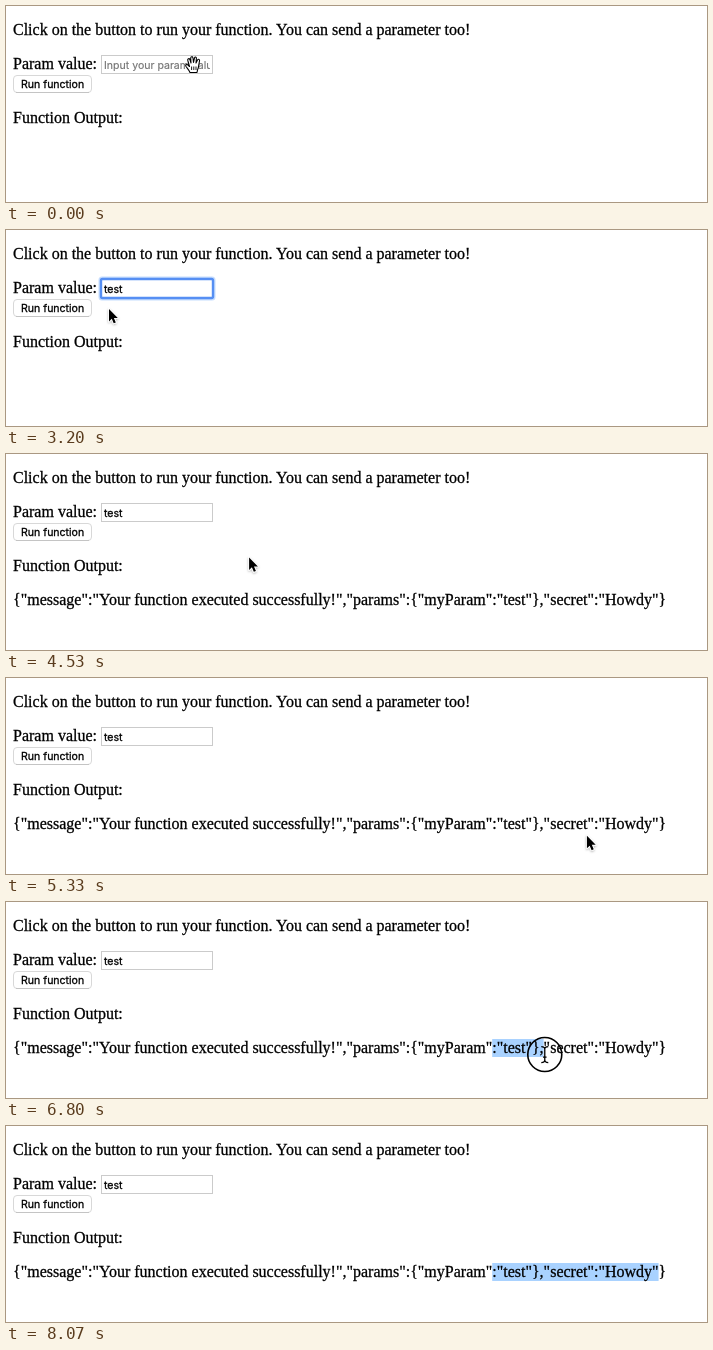
These frames come from a looping animation (701 by 196 pixels, 8390 ms). An HTML page:

```html
<!DOCTYPE html>
<html lang="en">
<head>
<meta charset="utf-8">
<title>Run function</title>
<style>
  html, body { margin: 0; width: 100%; height: 100%; overflow: hidden; background: #fff; }
  svg { display: block; }
  text { stroke: #000; stroke-width: .28; }
  .serif { font: 16px "Liberation Serif", Times, serif; }
  .ui { font: 10.55px Inter, "Liberation Sans", sans-serif; }
  #hint { fill: #757575; stroke: #757575; stroke-width: .15; }
  #arrow { stroke: #fff; stroke-width: 1.6; stroke-linejoin: round; paint-order: stroke; }
</style>
</head>
<body>
<svg width="701" height="196" viewBox="0 0 701 196">
  <defs>
    <clipPath id="field"><rect x="97" y="50" width="107" height="17"/></clipPath>
    <filter id="soft" x="-50%" y="-50%" width="200%" height="200%">
      <feDropShadow dx="0" dy="1" stdDeviation="0.9" flood-opacity="0.3"/>
    </filter>
  </defs>

  <g class="serif">
    <text x="7" y="29">Click on the button to run your function. You can send a parameter too!</text>
    <text x="7" y="63">Param value:</text>
    <text x="7" y="117">Function Output:</text>
    <rect id="selection" y="137" height="18" fill="#a9d2ff"/>
    <text id="output" x="7" y="151">{"message":"Your function executed successfully!","params":{"myParam":"test"},"secret":"Howdy"}</text>
  </g>

  <rect x="95.5" y="49.5" width="111" height="18" fill="#fff" stroke="#cbcbcb"/>
  <g id="ring" fill="none">
    <rect x="93.5" y="47.5" width="115" height="22" rx="2.5" stroke="#5a9bf8" stroke-opacity=".35" stroke-width="2"/>
    <rect x="95" y="49" width="112" height="19" rx="1.5" stroke="#568ff3" stroke-width="2.4"/>
  </g>
  <g class="ui" clip-path="url(#field)">
    <text id="hint" x="98" y="63">Input your param value</text>
    <text id="typed" x="98" y="63"></text>
  </g>
  <rect id="caret" y="52" width="1" height="14"/>

  <rect x="7.5" y="69.5" width="78" height="17" rx="3.5" fill="#fff" stroke="#d8d8d8"/>
  <path d="M10 86.5H83" stroke="#c4c4c4"/>
  <text class="ui" x="15" y="82">Run function</text>

  <circle id="press" fill="none" stroke="#000" stroke-width="1.6"/>
  <g id="pointer">
    <path id="arrow" filter="url(#soft)" d="M0 0V12.4L2.8 9.8 4.7 14.3 6.8 13.4 4.9 9H8.8Z"/>
    <path id="beam" fill="none" stroke="#000" stroke-width="1.3"
      d="M-3.5 -8Q0 -8 0 -5.5Q0 -8 3.5 -8M0 -6V6M-3.5 8Q0 8 0 5.5Q0 8 3.5 8M-1.8 2.5H1.8"/>
    <g id="hand" transform="translate(-8 -9)" stroke="#000" stroke-width="1.1" stroke-linejoin="round">
      <path fill="#fff" d="M5 16.5C4 14 2.5 12.5 1 10.5C0 9 1.5 8 3 9L4.5 10.5 2.8 4.5C2.3 2.5 4.3 2 5 3.8L6 7 5.7 2.2C5.7 .2 7.7 .2 8 2L8.5 6.5 9.5 2C9.9 .5 11.6 .8 11.4 2.5L11 7 12.5 4C13.4 2.6 15 3.4 14.5 5C13.8 8 13.7 12 12.5 14L12 16.5Z"/>
      <path fill="none" stroke-width=".9" d="M6.6 10.5V14M8.8 10.5V14M11 10.5V14"/>
    </g>
  </g>
</svg>

<script>
const LOOP = 8390, RATE = 15;   // motion is stepped at 15 ticks per second
const WORD = "test";

// Events, in ticks
const FOCUS = 22, TYPE = 30, TYPED = 36, REAPPEAR = 44, RUN = 58, RESULT = 61;
const GRAB = 93, DRAG = 98, DROP = 113, LEAVE = 121;
const BLINK = 7.5;

const el = id => document.getElementById(id);
const show = (id, on) => { el(id).style.display = on ? "" : "none"; };
const set = (id, attrs) => { for (const k in attrs) el(id).setAttribute(k, attrs[k]); };
const clamp = (v, lo, hi) => Math.min(hi, Math.max(lo, v));
const within = (v, lo, hi) => v >= lo && v < hi;
const smooth = u => u * u * (3 - 2 * u);

// Eased pointer moves
const home = { x: 187, y: 59 };
const moves = [
  { from: 0, to: 16, x: 168.5, y: 60.5 },
  { from: 43, to: 48, x: 103, y: 79 },
  { from: 48, to: 56, x: 46, y: 84 },
  { from: 63, to: 75, x: 570, y: 136 },
  { from: 76, to: 83, x: 588, y: 172 },
  { from: 83, to: GRAB, x: 483.5, y: 155.5 },
  { from: DRAG - 1, to: 110, x: 651, y: 146.5 },
  { from: 117, to: 120, x: 670, y: 137 }
];

const output = el("output"), line = output.textContent;
const edges = [...line].map((c, i) => output.getStartPositionOfChar(i).x)
  .slice(line.indexOf(':"test"'));

function pointerAt(tick) {
  return moves.reduce((p, m) => {
    const u = smooth(clamp((tick - m.from) / (m.to - m.from), 0, 1));
    return { x: p.x + (m.x - p.x) * u, y: p.y + (m.y - p.y) * u };
  }, home);
}

function pointerKind(tick, { x, y }) {
  if (tick < 1) return "hand";
  const overField = within(x, 95, 207) && within(y, 49, 68);
  const overOutput = tick >= RESULT && x < 661 && within(y, 137, 155.3);
  return overField || overOutput ? "beam" : "arrow";
}

function drawPointer(tick, pos) {
  const kind = pointerKind(tick, pos);
  for (const k of ["hand", "beam", "arrow"]) show(k, k === kind);
  show("pointer", tick < LEAVE && !within(tick, TYPE, REAPPEAR));
  set("pointer", { transform: `translate(${pos.x} ${pos.y})` });

  show("press", within(tick, FOCUS, FOCUS + 4) || within(tick, RUN, RESULT) || within(tick, GRAB, DROP));
  set("press", { cx: pos.x, cy: pos.y, r: kind === "beam" ? 17 : 22 });
}

function drawField(tick) {
  const count = clamp(Math.floor((tick - TYPE) / 2) + 1, 0, WORD.length);
  el("typed").textContent = WORD.slice(0, count);
  show("hint", count === 0);

  const focused = within(tick, FOCUS, RUN);
  const lastInput = tick < TYPE ? FOCUS : Math.min(tick, TYPED);
  show("ring", focused);
  show("caret", focused && Math.floor((tick - lastInput) / BLINK) % 2 === 0);
  set("caret", { x: 98 + Math.round(count ? el("typed").getComputedTextLength() : 0) });
}

function drawOutput(tick, { x }) {
  output.style.visibility = tick >= RESULT ? "visible" : "hidden";
  const near = edges.reduce((a, b) => Math.abs(b - x) < Math.abs(a - x) ? b : a);
  show("selection", tick >= DRAG);
  set("selection", { x: edges[0], width: near - edges[0] });
}

function draw(ms) {
  const tick = Math.floor((ms + 5) * RATE / 1000);
  const pos = pointerAt(tick);
  drawPointer(tick, pos);
  drawField(tick);
  drawOutput(tick, pos);
}

const start = performance.now();
function loop() {
  draw((performance.now() - start) % LOOP);
  requestAnimationFrame(loop);
}
loop();
</script>
</body>
</html>
```
